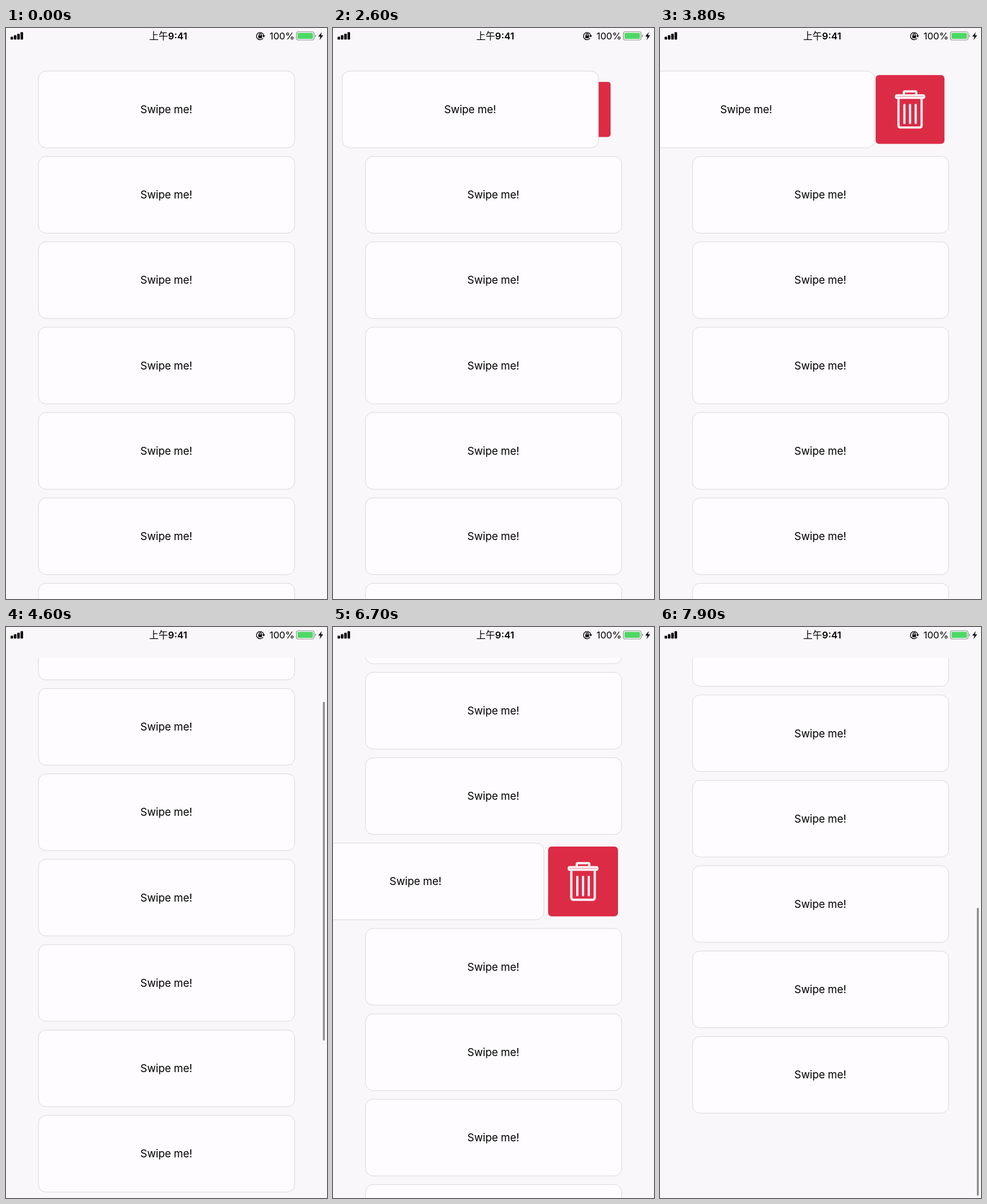
Animation of 561x998 px, one loop 8000 ms. Source, as an HTML page:

```html
<!DOCTYPE html>
<html lang="en">
<head>
<meta charset="utf-8">
<title>Swipe cards</title>
<style>
  html, body { margin: 0; width: 100%; height: 100%; overflow: hidden; background: #f9f7f9; }
  svg { display: block; width: 561px; height: 998px; }
  text { font-family: Inter, "Noto Sans CJK SC", "Noto Sans CJK", "Noto Sans", sans-serif; fill: #000; }
  .card rect { fill: #fefcfe; stroke: #d9d7da; }
  .card text { font-size: 18.6px; letter-spacing: -.1px; text-anchor: middle; }
  .icon { fill: none; stroke: #faf0f3; stroke-width: 4; stroke-linejoin: round; stroke-linecap: round; }
  .status { font-size: 16.5px; }
  .line { fill: none; stroke: #000; stroke-width: 1.4; }
</style>
</head>
<body>
<svg viewBox="0 0 561 998">
  <clipPath id="view"><rect y="54" width="561" height="944"/></clipPath>

  <g clip-path="url(#view)">
    <g id="list">
      <g id="trash">
        <rect x="-61" y="-61" width="122" height="122" rx="6" fill="#dc2b45"/>
        <g class="icon">
          <path d="M-11-26v-4q0-2 2-2h18q2 0 2 2v4"/>
          <rect x="-25" y="-25" width="50" height="4.5" rx="2"/>
          <path d="M-20.5-19v47q0 4 4 4h33q4 0 4-4v-47M-10-8v32M0-8v32M10-8v32"/>
        </g>
      </g>
    </g>
  </g>
  <rect id="bar" x="553.8" width="3.4" rx="1.7"/>

  <g class="status">
    <g id="signal"></g>
    <text x="283.5" y="20" text-anchor="middle" font-weight="600"><tspan font-weight="500">上午</tspan>9:41</text>
    <path class="line" d="M449.2 17.9A6.3 6.3 0 1 1 450.3 13"/>
    <path d="M447.8 13h5l-2.5 3.6z"/>
    <rect x="441" y="13" width="6.4" height="4.8" rx=".8"/>
    <path class="line" d="M442.3 13.5v-1.6a1.9 1.9 0 0 1 3.8 0v1.6"/>
    <text x="460.5" y="20">100%</text>
    <rect x="507.5" y="6.5" width="31" height="14.5" rx="3.5" fill="none" stroke="#929292" stroke-width="1.2"/>
    <rect x="509.5" y="8.5" width="27" height="10.5" rx="1.8" fill="#4cd964"/>
    <path d="M540 11.3q1.8 .8 1.8 2.5t-1.8 2.5z" fill="#929292"/>
    <path d="M552 7l-6.2 8h3.9l-1.7 6.2 6.3-8.4h-4z"/>
  </g>
</svg>
<script>
const LOOP = 8000, STEP = 100, PITCH = 149.2, OPEN = 136;
const $ = id => document.getElementById(id);
const set = (node, attrs) => Object.entries(attrs).forEach(([k, v]) => node.setAttribute(k, v));

const ramp = (t, start, length) => Math.min(1, Math.max(0, (t - start) / length));
const smooth = u => u * u * (3 - 2 * u);
const inOut = u => u < .5 ? 4 * u ** 3 : 1 - 4 * (1 - u) ** 3;

// Accelerating pull past the open position, settling back to it, then closing
function swipe(t, start, release, peak, power) {
  const pull = peak * ramp(t, start, release - start) ** power;
  const settle = (peak - OPEN) * smooth(ramp(t, release, 400));
  return (pull - settle) * (1 - inOut(ramp(t, release + 400, 440)));
}

const scrollAt = t =>
  443.6 * smooth(ramp(t, 4200, 1188)) + 258.9 * smooth(ramp(t, 7350, 550));

const barAlpha = t =>
  ramp(t, 4200, 100) - ramp(t, 5350, 215) + ramp(t, 7350, 50);

const cards = Array.from({ length: 10 }, () => {
  $('list').insertAdjacentHTML('beforeend', `<g class="card">
    <rect x="56.8" y="75.3" width="447.7" height="134" rx="13"/>
    <text x="280.2" y="149">Swipe me!</text></g>`);
  return $('list').lastElementChild;
});

for (let i = 0; i < 4; i++) {
  const h = 5 + 2.7 * i;
  $('signal').insertAdjacentHTML('beforeend',
    `<rect x="${8 + i * 5.8}" y="${20.3 - h}" width="4.4" height="${h}" rx="1.2"/>`);
}

function draw(t) {
  const scroll = scrollAt(t);
  const active = t < 5000 ? 0 : 5;
  const drag = active ? swipe(t, 5650, 6300, 158, 2) : swipe(t, 1100, 3300, 188, 4);

  set($('list'), { transform: `translate(0 ${-scroll})` });
  cards.forEach((card, i) =>
    set(card, { transform: `translate(${i === active ? -drag : 0} ${i * PITCH})` }));

  const scale = .7 + .3 * Math.min(1, drag / OPEN);
  set($('trash'), {
    transform: `translate(437 ${142.3 + active * PITCH}) scale(${scale})`,
    visibility: drag > 0 ? 'visible' : 'hidden'
  });

  // The bar shrinks against the bottom when scrolled past the end
  const height = 592 - .57 * Math.max(0, scroll - 547);
  set($('bar'), {
    height,
    y: Math.min(57 + .631 * scroll, 994 - height),
    opacity: .43 * barAlpha(t)
  });
}

const start = performance.now();
function tick() {
  const t = (performance.now() - start) % LOOP;
  draw(Math.floor(t / STEP) * STEP);
  requestAnimationFrame(tick);
}
tick();
</script>
</body>
</html>
```
